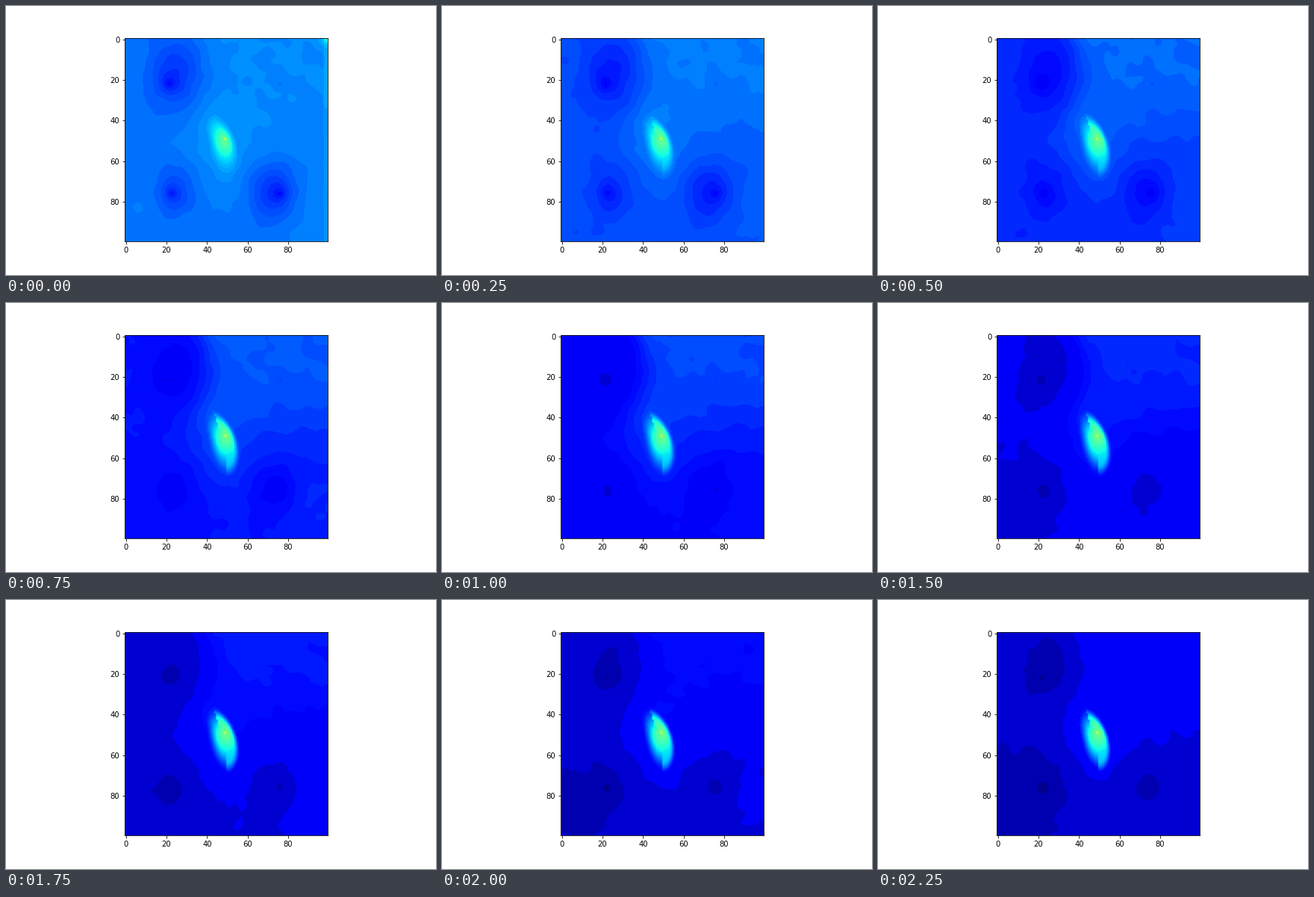
A matplotlib script for the animation above (2.5 s loop, 576x360 px).

```python
import numpy as np
import matplotlib.pyplot as plt
from matplotlib.animation import FuncAnimation
from matplotlib.colors import BoundaryNorm, ListedColormap

FRAMES, INTERVAL, SIZE = 10, 250, 100
Y, X = np.mgrid[0:SIZE, 0:SIZE].astype(float)


def sigmoid(z):
    return 1 / (1 + np.exp(-z))


def ramp(z):
    z = np.clip(z, 0, 1)
    return z * z * (3 - 2 * z)


def decay(t, start, end, tau):
    return end + (start - end) * np.exp(-t / tau)


def gauss(cx, cy, sx, sy):
    return np.exp(-((X - cx) / sx) ** 2 / 2 - ((Y - cy) / sy) ** 2 / 2)


def cone(cx, cy, scale):
    return np.exp(-np.hypot(X - cx, Y - cy) / scale)


def smooth_noise(seed, passes):
    n = np.random.default_rng(seed).normal(size=(SIZE, SIZE))
    for _ in range(passes):
        for axis in (0, 1):
            n = (np.roll(n, 1, axis) + n + np.roll(n, -1, axis)) / 3
    return n / n.std()


# A winding ridge parts the cool left side from the warm right side
ridge = 37 + 5 * np.sin(2 * np.pi * Y / 66) + 43 * (Y / 99) ** 5
SIDE = sigmoid((X - ridge) / (2.5 + .045 * Y))
LOWER = sigmoid((Y - 40) / 8)

WELLS = (gauss(24, 16, 9, 12) + .7 * gauss(25, 75, 6.5, 9)
         + 1.25 * gauss(72, 75, 8, 10))
TIPS = cone(21.5, 22, 3) + cone(22.5, 76, 3) + cone(76, 76, 3)
POOL = gauss(8, 84, 16, 18)
HALO = gauss(47, 54, 10, 14)
COARSE = smooth_noise(4, 14)

# Bent ellipse: signed offset from its axis and distance from its centre
dy = Y - 53
dx = X - (48 + .22 * dy - .006 * dy ** 2)
LEAF_DIST = np.hypot(dx / 7.8, dy / 17)
LEAF_HEAT = .39 - .004 * (Y - 46)
CORE = .1 * gauss(49.5, 50, 3, 4.5)


def field(t):
    left = decay(t, .24, .04, 4.5)
    top, bottom = .262 - .0165 * t, decay(t, .25, .046, 5)
    right = top + (bottom - top) * LOWER
    v = left + (right - left) * SIDE
    v += .025 * HALO - .003 * t * POOL
    v -= decay(t, .06, .018, 3) * WELLS
    v -= decay(t, .065, .03, 1) * TIPS
    v -= .03 * (1 - t / FRAMES) * cone(76, 22, 1.2)
    v += np.exp(-2 * t) * (.02 * (X >= 98) + .14 * cone(99, 0, 2))
    v += .002 * COARSE + .001 * smooth_noise(20 + t, 4)

    softness = np.where(dx < 0, .8, decay(t, .75, .4, 1))
    leaf = ramp((1 - LEAF_DIST) / softness)
    v += (LEAF_HEAT + CORE - v) * leaf
    v[49, 49] = .62
    return np.clip(v, .001, .68)


# Wide steps in the dark blues, narrow ones in the bright centre
bounds = np.concatenate([np.linspace(0, .086, 4), np.arange(.125, .30, .017),
                         np.arange(.31, .70, .01)])
mids = (bounds[:-1] + bounds[1:]) / 2
palette = ListedColormap(plt.get_cmap("jet")(mids))

plt.rcParams["font.family"] = "DejaVu Sans"
fig, ax = plt.subplots(figsize=(8, 5), dpi=72, facecolor="white")
fig.subplots_adjust(left=.125, right=.9, bottom=.125, top=.88)
image = ax.imshow(field(0), cmap=palette, norm=BoundaryNorm(bounds, palette.N),
                  interpolation="hanning")
ax.set_xticks(range(0, SIZE, 20))
ax.set_yticks(range(0, SIZE, 20))


def update(step):
    image.set_data(field(step))
    return (image,)


anim = FuncAnimation(fig, update, frames=FRAMES, interval=INTERVAL,
                     repeat=True, repeat_delay=0)
plt.show()
```
